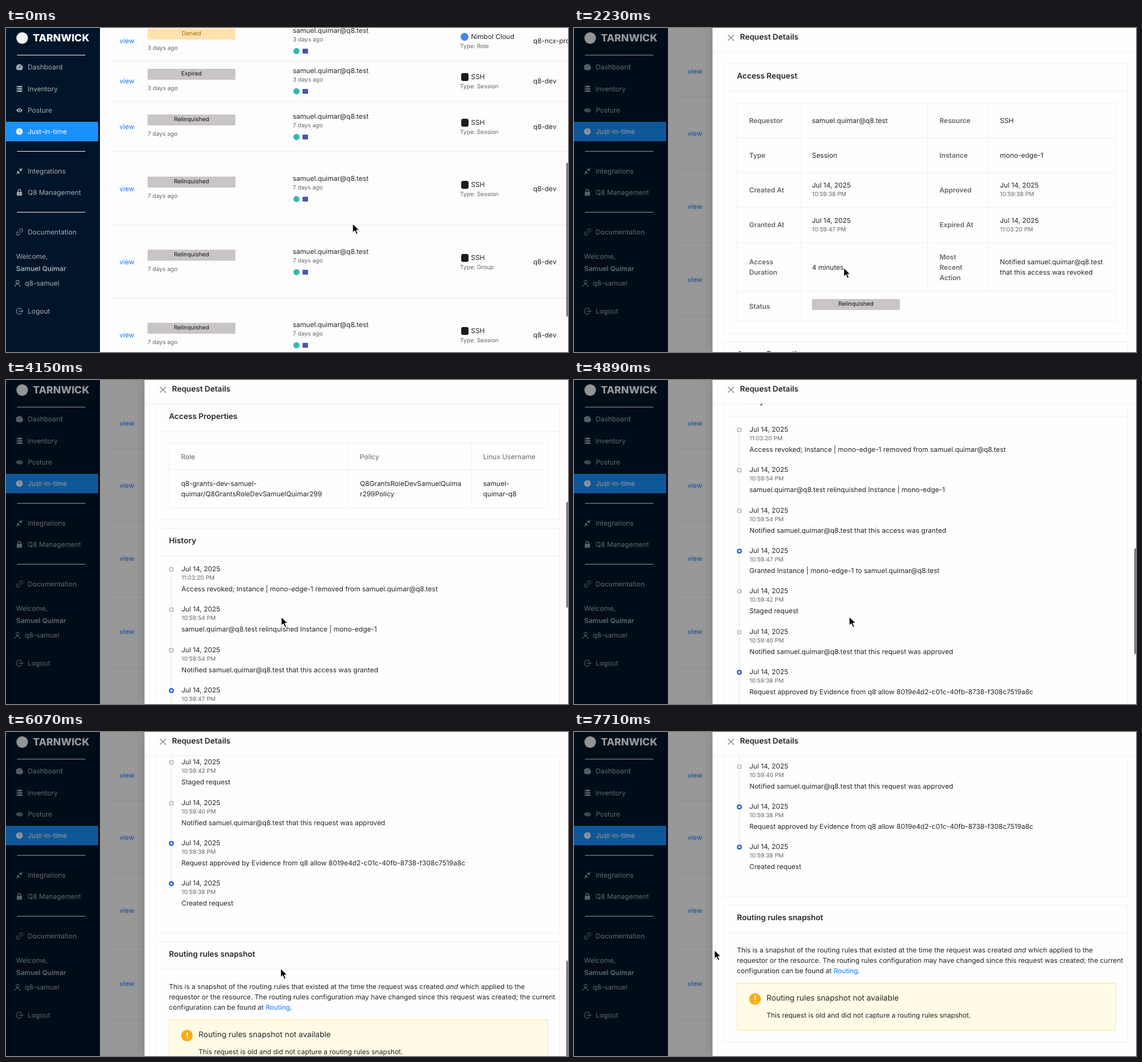
An HTML page for the animation above (8000 ms loop, 921 px wide and 532 px high).

```html
<!DOCTYPE html>
<html lang="en">
<head>
<meta charset="utf-8">
<title>Request details</title>
<style>
html, body { margin: 0; width: 100%; height: 100%; overflow: hidden; }
body { background: #fdfdfd; font: 11.13px/20px Inter, "Open Sans", sans-serif; color: #262626; text-rendering: geometricPrecision; }
#stage { position: relative; width: 921px; height: 532px; overflow: hidden; background: #fdfdfd; }
#stage div, #stage span, #stage svg { position: absolute; }
#stage span { white-space: nowrap; }
#stage span i { font-style: italic; }
.small { font-size: 9.54px; color: #666; }
.link, a { color: #1677ff; }
.label { font-weight: 600; color: #666; }
.head { font-size: 12.72px; font-weight: 600; }
.big { font-size: 12.72px; }
.grey { color: #666; }
.tag { width: 144px; height: 18px; line-height: 18px; font-size: 9.54px; text-align: center; color: #141414; background: #c9c5c5; border-radius: 1px; }
.tag.denied { background: #ffe1ad; color: #a6640c; }
#list, #body { left: 0; top: 0; }
.row { left: 173px; width: 748px; }
#side { left: 0; top: 0; width: 154px; height: 532px; background: #001529; color: #a6adb4; }
#side .on { color: #fff; }
#side .name { left: 44px; top: 6px; font-size: 16.5px; font-weight: 800; color: #fff; }
#mask { left: 0; top: 0; width: 921px; height: 532px; background: #000; }
#drawer { left: 227px; top: 0; width: 694px; height: 532px; background: #fefefe;
  box-shadow: -6px 0 16px -8px rgba(0,0,0,.08), -5px 0 16px rgba(0,0,0,.06); }
#view { left: 0; top: 39px; width: 694px; height: 493px; overflow: hidden; }
#body { left: -227px; top: -39px; }
.thumb { left: 918px; width: 6px; border-radius: 3px 0 0 3px; background: #7d7d7d; }
.box { box-sizing: border-box; border: 1px solid #f0f0f0; }
.dot { box-sizing: border-box; width: 8px; height: 8px; border: 2px solid #c2c2c2; border-radius: 50%; background: #fff; }
.dot.blue { border-color: #1454d4; }
</style>
</head>
<body>
<div id="stage">
  <div id="list"></div>
  <div id="listThumb" class="thumb" style="height:253px"></div>
  <div id="side"></div>
  <div id="mask"></div>
  <div id="drawer">
    <div id="view"><div id="body"></div></div>
    <div id="header"></div>
  </div>
  <div id="bodyThumb" class="thumb" style="height:174px"></div>
  <svg id="cursor" width="16" height="22" viewBox="-2 -2 16 22" style="left:-2px;top:-2px">
    <path d="M0 0V15.2L3.5 12L6 17.8L8.7 16.6L6.2 11H11Z" stroke="#fff" stroke-width="1.2" stroke-linejoin="round"/>
  </svg>
</div>
<script>
const $ = id => document.getElementById(id);
const list = $('list'), side = $('side'), header = $('header'), body = $('body');

function add(parent, tag, cls, css, html = '') {
  const el = document.createElement(tag);
  el.className = cls;
  el.style.cssText = css;
  el.innerHTML = html;
  parent.append(el);
  return el;
}
// Text is placed by its left edge and the middle of its line.
const text = (p, x, y, s, cls = '') => add(p, 'span', cls, `left:${x}px;top:${y - 10}px`, s);
const rect = (p, x, y, w, h, fill, r = 0) =>
  add(p, 'div', '', `left:${x}px;top:${y}px;width:${w}px;height:${h}px;background:${fill};border-radius:${r}px`);
const box = (p, x, y, w, h) => add(p, 'div', 'box', `left:${x}px;top:${y}px;width:${w}px;height:${h}px`);
const tag = (p, x, y, s, cls = '') => add(p, 'div', 'tag ' + cls, `left:${x}px;top:${y}px`, s);
const icon = (p, x, y, shape, cls = '') => add(p, 'div', cls, `left:${x - 6}px;top:${y - 6}px`,
  `<svg width="12" height="12" viewBox="0 0 12 12" fill="none" stroke="currentColor" stroke-linecap="round">${shape}</svg>`);

// Request list
const mail = 'samuel.quimar@q8.test';
const rows = [
  [-12, 54, 21, 'Denied', '3 days ago', 'Role'],
  [54, 120, 87, 'Expired', '3 days ago', 'Session'],
  [120, 203, 162, 'Relinquished', '7 days ago', 'Session'],
  [203, 323, 264, 'Relinquished', '7 days ago', 'Session'],
  [323, 443, 384, 'Relinquished', '7 days ago', 'Group'],
  [443, 563, 504, 'Relinquished', '7 days ago', 'Session']
].map(([top, bottom, c, status, ago, type]) => {
  const el = add(list, 'div', 'row', `top:${top + 1}px;height:${bottom - top}px`);
  const cloud = type === 'Role';
  rect(list, 172, bottom, 749, 1, '#ececec');
  text(list, 186, c, 'view', 'link');
  tag(list, 232, c - 20, status, cloud ? 'denied' : '');
  text(list, 232, c + 13, ago, 'small');
  text(list, 470, c - 17, mail);
  text(list, 470, c - 1, ago, 'small');
  rect(list, 471, c + 12, 10, 10, '#36b6b0', 5);
  rect(list, 486, c + 13, 9, 8, '#4a55b8', 1);
  if (cloud) rect(list, 745, c - 13, 13, 13, '#4285f4', 7);
  else rect(list, 746, c - 13, 12, 13, '#1c1c1c', 3);
  text(list, 762, c - 7, cloud ? 'Nimbol Cloud' : 'SSH');
  text(list, 744, c + 10, 'Type: ' + type, 'small');
  text(list, 864, c, cloud ? 'q8-ncx-prod' : 'q8-dev');
  return { el, top, bottom };
});

// Sidebar
const shapes = {
  gauge: '<path d="M2.2 10.5A5.2 5.2 0 1 1 9.8 10.5Z" fill="currentColor"/><path d="M6 7.5L8 4.5M3 6.8h.4M6 3.4v.3" stroke="#001529"/>',
  rack: '<path d="M1.5 1h9v2.6h-9zM1.5 4.7h9v2.6h-9zM1.5 8.4h9V11h-9z" fill="currentColor" stroke="none"/><path d="M3 2.3h.4M3 6h.4M3 9.7h.4" stroke="#001529"/>',
  eye: '<path d="M.5 6Q6-1.2 11.5 6Q6 13.2.5 6Z" fill="currentColor" stroke="none"/><circle cx="6" cy="6" r="2" stroke="#001529"/>',
  clock: '<circle cx="6" cy="6" r="5.4" fill="currentColor" stroke="none"/><path d="M6 3v3.2l2 1.3" stroke="#1890ff"/>',
  plug: '<path d="M3 5.2L6.8 9Q4.5 11 2.8 9.2Q1.2 7.5 3 5.2ZM5.2 3Q7.5 1 9.2 2.8Q11 4.5 9 6.8Z" fill="currentColor" stroke="none"/><path d="M.8 11.2L2.8 9.2M9.2 2.8L11.2 .8M5 7L6 6"/>',
  lock: '<path d="M1.8 5.3h8.4v5.9H1.8z" fill="currentColor" stroke="none"/><path d="M3.7 5.3V3.4a2.3 2.3 0 0 1 4.6 0v1.9" stroke-width="1.2"/><path d="M6 7.6v1.3" stroke="#001529"/>',
  chain: '<path d="M5 3.2L6.8 1.5a2.6 2.6 0 0 1 3.7 3.7L8.8 7M7 8.8L5.2 10.5a2.6 2.6 0 0 1-3.7-3.7L3.2 5M4.3 7.7l3.4-3.4"/>',
  user: '<circle cx="6" cy="3.7" r="2.6"/><path d="M1.5 11.3Q1.7 7.5 6 7.4Q7.7 7.4 8.8 8.3M8.5 10.8h2.5"/>',
  exit: '<path d="M9.6 2.6a5 5 0 1 0 0 6.8M5.5 6h6M10 4.5L11.5 6L10 7.5"/>'
};
rect(side, 17, 7, 19, 19, '#f4f7f7', 10);
add(side, 'span', 'name', '', 'TARNWICK');
rect(side, 0, 154, 151, 32, '#1890ff');
[44, 202, 302].forEach(y => rect(side, 18, y, 112, 1, '#e6e8ea'));
[
  [64, 'gauge', 'Dashboard'], [100, 'rack', 'Inventory'], [135, 'eye', 'Posture'], [170, 'clock', 'Just-in-time'],
  [235, 'plug', 'Integrations'], [270, 'lock', 'Q8 Management'], [335, 'chain', 'Documentation'], [465, 'exit', 'Logout']
].forEach(([y, shape, name]) => {
  const cls = shape === 'clock' ? 'on' : '';
  icon(side, 21.5, y, shapes[shape], cls);
  text(side, 35.5, y, name, cls);
});
text(side, 16.5, 375, 'Welcome,');
text(side, 16.5, 395, '<b style="font-weight:600">Samuel Quimar</b>');
icon(side, 18.5, 419, shapes.user);
text(side, 31, 419, 'q8-samuel');

// Drawer header
rect(header, 0, 0, 694, 38, '#fefefe');
rect(header, 0, 38, 694, 1, '#f0f0f0');
icon(header, 29.5, 15.5, '<path d="M1.5 1.5l9 9M10.5 1.5l-9 9" stroke="#7a7a7a" stroke-width="1.1"/>');
text(header, 45, 15.5, 'Request Details', 'head');

// Drawer cards
function card(y, bottom, title) {
  box(body, 246, y, 662, bottom - y);
  rect(body, 247, y + 45, 660, 1, '#f0f0f0');
  text(body, 267, y + 22, title, 'head');
}
const hline = y => rect(body, 267, y, 621, 1, '#f0f0f0');
const vline = (x, y, h) => rect(body, x, y, 1, h, '#f0f0f0');
function stamp(x, y, time) {
  text(body, x, y, 'Jul 14, 2025');
  text(body, x, y + 16, time, 'small');
}
const lines = (x, y, parts, cls) => parts.forEach((s, i) => text(body, x, y + i * 17.4, s, cls));

card(-202, 242, 'Access Request');
box(body, 267, -137, 621, 359);
[-80, -23, 34, 92, 172].forEach(hline);
vline(370, -137, 358);
[579, 678].forEach(x => vline(x, -137, 309));
text(body, 287, -108, 'Requestor', 'label');
text(body, 390, -108, mail);
text(body, 599, -108, 'Resource', 'label');
text(body, 698, -108, 'SSH');
text(body, 287, -51, 'Type', 'label');
text(body, 390, -51, 'Session');
text(body, 599, -51, 'Instance', 'label');
text(body, 698, -51, 'mono-edge-1');
text(body, 287, 6, 'Created At', 'label');
stamp(390, -2, '10:59:38 PM');
text(body, 599, 6, 'Approved', 'label');
stamp(698, -2, '10:59:38 PM');
text(body, 287, 63, 'Granted At', 'label');
stamp(390, 56, '10:59:47 PM');
text(body, 599, 63, 'Expired At', 'label');
stamp(698, 56, '11:03:20 PM');
lines(287, 124, ['Access', 'Duration'], 'label');
text(body, 390, 133, '4 minutes');
lines(599, 115.5, ['Most', 'Recent', 'Action'], 'label');
lines(698, 124, ['Notified ' + mail, 'that this access was revoked']);
text(body, 287, 197, 'Status', 'label');
tag(body, 390, 185, 'Relinquished');

card(255, 446, 'Access Properties');
box(body, 267, 319, 621, 107);
hline(363);
[560, 762].forEach(x => vline(x, 319, 106));
text(body, 287, 342, 'Role', 'grey');
text(body, 580, 342, 'Policy', 'grey');
text(body, 782, 342, 'Linux Username', 'grey');
lines(287, 386, ['q8-grants-dev-samuel-', 'quimar/Q8GrantsRoleDevSamuelQuimar299']);
lines(580, 386, ['Q8GrantsRoleDevSamuelQuima', 'r299Policy']);
lines(782, 386, ['samuel-', 'quimar-q8']);

card(459, 1073, 'History');
const node = 'Instance | mono-edge-1';
[
  ['11:03:20', `Access revoked; ${node} removed from ${mail}`],
  ['10:59:54', `${mail} relinquished ${node}`],
  ['10:59:54', `Notified ${mail} that this access was granted`],
  ['10:59:47', `Granted ${node} to ${mail}`, 'blue'],
  ['10:59:42', 'Staged request'],
  ['10:59:40', `Notified ${mail} that this request was approved`],
  ['10:59:38', 'Request approved by Evidence from q8 allow 8019e4d2-c01c-40fb-8738-f308c7519a8c', 'blue'],
  ['10:59:38', 'Created request', 'blue']
].forEach(([time, note, cls = ''], i, all) => {
  const y = 526 + Math.round(i * 66.3);
  if (i < all.length - 1) rect(body, 270, y + 7, 1.5, 55, '#f0f0f0');
  add(body, 'div', 'dot ' + cls, `left:267px;top:${y - 3}px`);
  stamp(287.5, y, time + ' PM');
  text(body, 287.5, y + 33, note);
});

card(1086, 1312, 'Routing rules snapshot');
lines(267, 1159.5, [
  'This is a snapshot of the routing rules that existed at the time the request was created <i>and</i> which applied to the',
  'requestor or the resource. The routing rules configuration may have changed since this request was created; the current',
  'configuration can be found at <a>Routing</a>.'
]);
box(body, 267, 1214, 621, 78).style.cssText += 'background:#fffbe6;border-color:#ffe58f';
rect(body, 287, 1231, 19, 19, '#faad14', 10);
rect(body, 295.5, 1235, 2, 7, '#fff', 1);
rect(body, 295.5, 1244, 2, 2, '#fff', 1);
text(body, 315.5, 1240, 'Routing rules snapshot not available', 'big');
text(body, 315.5, 1267, 'This request is old and did not capture a routing rules snapshot.');

// Motion: time advances in even steps; values run straight between [step, value] keys.
const LOOP = 8000, STEP = 148;
function track(k, keys) {
  let [k0, v0] = keys[0];
  if (k <= k0) return v0;
  for (const [k1, v1] of keys.slice(1)) {
    if (k < k1) return v0 + (v1 - v0) * (k - k0) / (k1 - k0);
    [k0, v0] = [k1, v1];
  }
  return v0;
}
const tracks = {
  list: [[0, 0], [1, 60], [2, 91]],
  listThumb: [[3, 1], [6, 0]],
  x: [[3, 568], [4, 545], [5, 465], [6, 350], [7, 255], [8, 210], [9, 199], [11, 199], [12, 215], [13, 300], [14, 395], [15, 442], [16, 451], [38, 451], [40, 450], [46, 450], [47, 437], [48, 385], [49, 315], [50, 262], [51, 238], [52, 230]],
  y: [[3, 321], [5, 345], [7, 397], [9, 410], [11, 410], [13, 402], [16, 389], [40, 388], [46, 388], [49, 372], [52, 357.5]],
  drawer: [[9, 720], [10, 673], [11, 66], [12, 0]],
  mask: [[10, 0], [11, .33], [12, .4]],
  body: [[16, -260], [18, -150], [20, -24], [21, 0], [23, 70], [25, 140], [28, 216], [30, 290], [33, 445], [36, 545], [41, 742], [43, 802]],
  bodyThumb: [[15, 0], [16, 1], [46, 1], [49, 0]]
};
const move = (el, x, y) => el.style.transform = `translate(${x}px,${y}px)`;

function draw(now) {
  const k = Math.floor(now % LOOP / STEP);
  const v = {};
  for (const name in tracks) v[name] = track(k, tracks[name]);
  const scroll = Math.round(v.list), d = Math.round(v.body);
  move(list, 0, -scroll);
  move($('listThumb'), 0, 221 + scroll * .45);
  $('listThumb').style.opacity = v.listThumb;
  const hovering = k >= 4 && k < 11, under = v.y + scroll;
  rows.forEach(r => r.el.style.background = hovering && under > r.top && under <= r.bottom ? '#f5f5f5' : '');
  move($('drawer'), Math.round(v.drawer), 0);
  $('drawer').style.visibility = v.drawer < 700 ? 'visible' : 'hidden';
  $('mask').style.opacity = v.mask;
  move(body, 0, -d);
  move($('bodyThumb'), 0, 128 + d / 3);
  $('bodyThumb').style.opacity = v.bodyThumb;
  move($('cursor'), v.x, v.y);
}
const start = performance.now();
function frame() {
  draw(performance.now() - start);
  requestAnimationFrame(frame);
}
frame();
</script>
</body>
</html>
```
